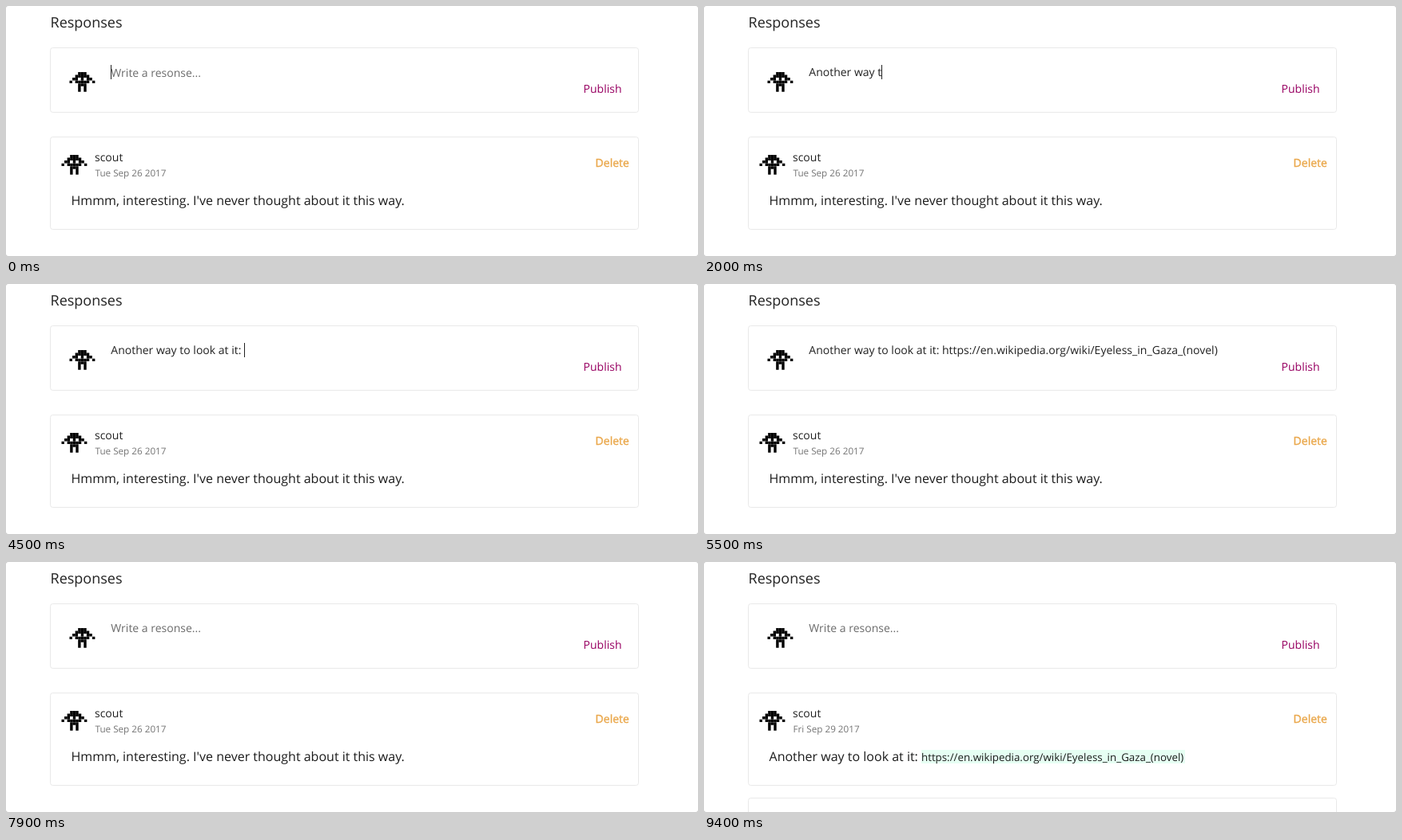
An HTML page that plays this animation: 866x314 px, repeating every 9.5 s.

```html
<!DOCTYPE html>
<html lang="en">
<head>
<meta charset="utf-8">
<title>Responses</title>
<style>
  html, body { margin: 0; width: 100%; height: 100%; overflow: hidden; background: #c4c4c4; }
  svg { display: block; width: 866px; height: 314px; }
  text { font-family: "Open Sans", sans-serif; font-size: 14px; fill: #222; white-space: pre; text-rendering: geometricPrecision; }
  .title { font-size: 18px; }
  .body { font-size: 16px; fill: #1c1c1c; }
  .date { font-size: 11.7px; fill: #757575; }
  .hint { fill: #6c6c6c; }
  .publish { fill: #980062; }
  .delete { fill: #eaa84c; stroke: #eaa84c; stroke-width: .4px; }
  .link { font-size: 13.33px; fill: #1c1c1c; }
  .card { fill: #fff; stroke: #e9e9e9; }
</style>
</head>
<body>
<svg viewBox="0 0 866 314">
  <defs><path id="avatar"/></defs>
  <rect width="866" height="314" rx="3" fill="#fff"/>
  <text class="title" x="55.5" y="27">Responses</text>

  <rect class="card" x="55.5" y="52.5" width="736" height="81" rx="3"/>
  <use href="#avatar" x="79.5" y="83"/>
  <text id="hint" class="hint" x="131.3" y="88">Write a resonse...</text>
  <text id="input" x="131.3" y="88"></text>
  <rect id="caret" y="74" width="1" height="18" fill="#222"/>
  <text class="publish" x="722.6" y="109">Publish</text>

  <rect class="card" x="55.5" y="164.5" width="736" height="116" rx="3"/>
  <use href="#avatar" x="69.5" y="187"/>
  <text x="111" y="195">scout</text>
  <text id="date" class="date" x="111.5" y="214"></text>
  <text class="delete" x="737.6" y="202">Delete</text>
  <text id="body" class="body" x="81.5" y="250"></text>
  <g id="posted">
    <rect x="272" y="236" width="330" height="17" fill="#e6fff3"/>
    <text id="link" class="link" x="272" y="250"></text>
    <rect class="card" x="55.5" y="296.5" width="736" height="116" rx="3"/>
  </g>
</svg>
<script>
const LOOP = 9500, PASTE = 4800, SENT = 7900, POSTED = 8000;
const LEAD = "Another way to look at it: ";
const URL_TEXT = "https://en.wikipedia.org/wiki/Eyeless_in_Gaza_(novel)";
const FIRST = "Hmmm, interesting. I've never thought about it this way.";
// Typing bursts: start, end, characters before, characters after
const BURSTS = [[150, 1000, 0, 8], [1500, 2950, 8, 20], [3300, 4450, 20, 27]];
const BLINKS = [[5300, 5900], [6300, 6900], [7300, SENT]];
const SPRITE = [
  "...XXX...",
  "..XXXXX..",
  ".XX.X.XX.",
  "X.XXXXX.X",
  "...XXX...",
  "...X.X...",
  "...X.X..."
];

const $ = id => document.getElementById(id);
const show = (id, on) => $(id).setAttribute("visibility", on ? "visible" : "hidden");
const write = (id, s) => { if ($(id).textContent !== s) $(id).textContent = s; };
const pen = document.createElement("canvas").getContext("2d");

const CELL = 3.56;
$("avatar").setAttribute("d", SPRITE.flatMap((row, y) => [...row].map((c, x) =>
  c === "X" ? `M${x * CELL} ${y * CELL}h3.4v3.4h-3.4z` : "")).join(""));
$("link").textContent = URL_TEXT;

function typed(t) {
  if (t >= SENT) return "";
  if (t >= PASTE) return LEAD + URL_TEXT;
  let n = 0;
  for (const [a, b, from, to] of BURSTS) {
    if (t >= a) n = Math.min(to, from + 1 + Math.floor((t - a) / (b - a) * (to - from)));
  }
  return LEAD.slice(0, n);
}

function draw(t) {
  const s = typed(t), focused = t < SENT, posted = t >= POSTED;
  write("input", s);
  show("hint", !s);
  $("hint").setAttribute("y", focused ? 89 : 88);
  pen.font = '14px "Open Sans", sans-serif';
  $("caret").setAttribute("x", Math.round(131 + pen.measureText(s).width));
  show("caret", focused && !BLINKS.some(([a, b]) => t >= a && t < b));
  write("date", posted ? "Fri Sep 29 2017" : "Tue Sep 26 2017");
  write("body", posted ? LEAD : FIRST);
  show("posted", posted);
}

const start = performance.now();
function tick() {
  draw((performance.now() - start) % LOOP);
  requestAnimationFrame(tick);
}
draw(0);
requestAnimationFrame(tick);
</script>
</body>
</html>
```
